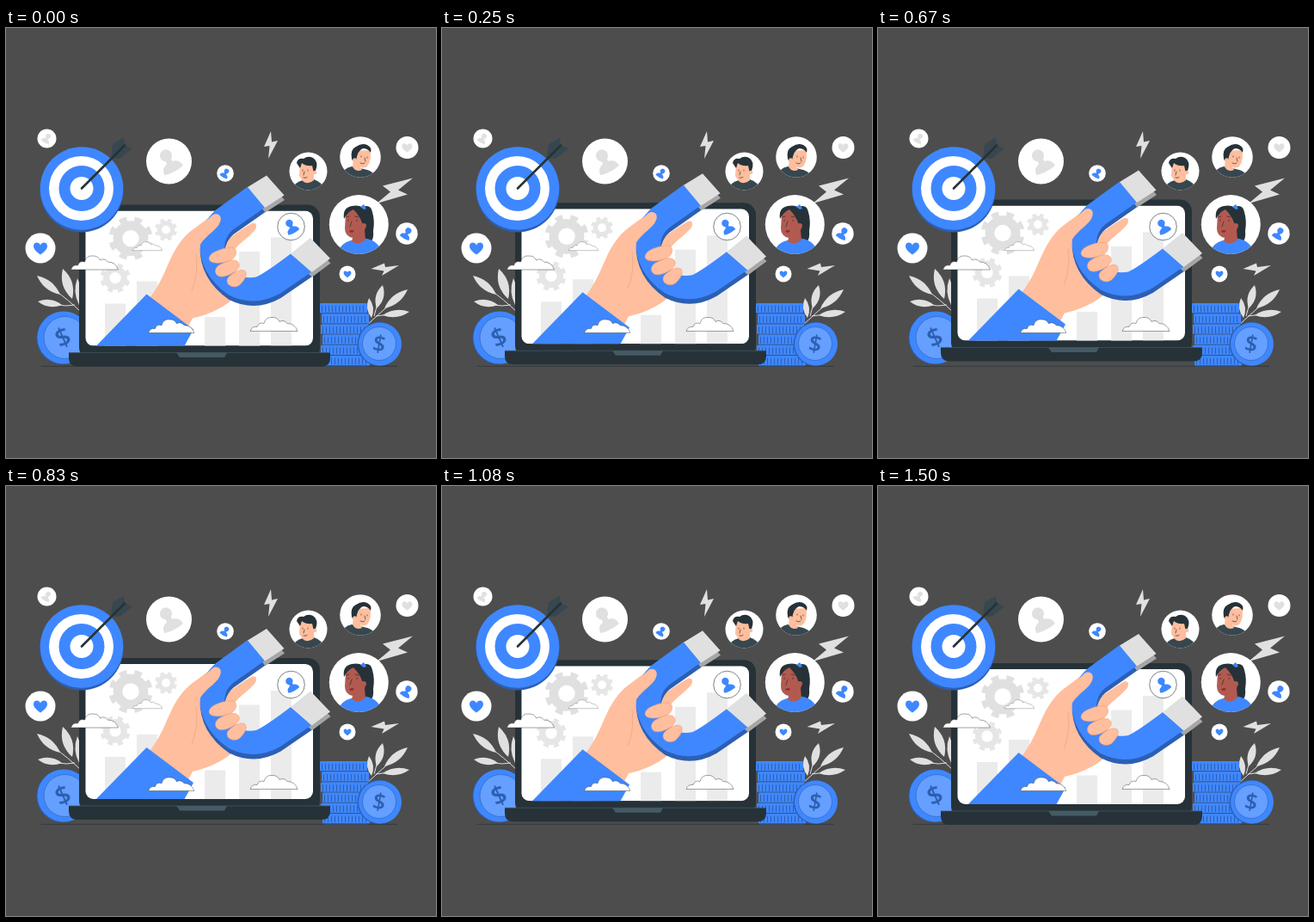
These frames come from a looping animation (500 by 500 pixels, 1540 ms). An HTML page:

```html
<!DOCTYPE html>
<html lang="en">
<head>
<meta charset="utf-8">
<title>Magnet marketing</title>
<style>
html, body { margin: 0; width: 100%; height: 100%; overflow: hidden; background: #4d4d4d; }
svg { display: block; width: 100%; height: 100%; }
text { font: 600 30px "Open Sans", sans-serif; text-anchor: middle; }
.blue { fill: #3f87ff; }
.deep { fill: #2c5fb3; }
.dark { fill: #263238; }
.slate { fill: #37474f; }
.white { fill: #fff; }
.pale { fill: #ebebeb; }
.grey { fill: #e0e0e0; }
.shade { fill: #a6a6a6; }
.skin { fill: #ffbe9d; }
.brown { fill: #b25a50; }
.face { fill: #659fff; stroke: #2c5fb3; stroke-width: .6; }
.line { fill: none; stroke: #263238; stroke-width: .7; stroke-linecap: round; }
</style>
</head>
<body>
<svg viewBox="0 0 500 500">
<defs>
  <g id="person">
    <circle cy="-7.5" r="7"/>
    <path d="M-12 12C-12 4-7 3-3.500 1.500V-3H3.500V1.500C7 3 12 4 12 12Q0 15-12 12Z"/>
  </g>
  <path id="heart" d="M0 7.500C-5 4-8 1-8-2.500C-8-7-2-8 0-3.500C2-8 8-7 8-2.500C8 1 5 4 0 7.500Z"/>
  <path id="cloud" d="M0 17Q2 11 8 12Q10 6 16 8Q18 0 26 1Q32 1 34 6Q39 3 43 8Q52 8 55 17Z"/>
  <path id="magnet" d="M281 184L301 208L264 234Q250 246 256 266Q266 294 291 289Q302 284 331 262L355.500 283L319 308Q289 325 259 310Q224 286 225 247Q228 225 244 211Z"/>
  <path id="tips" d="M281 184.500L303 171L323.500 194L301 208.500ZM331 262L354 243.500L377 267.500L355.500 283.500Z"/>
  <clipPath id="screen"><rect x="92.500" y="212" width="264.500" height="157" rx="9"/></clipPath>
  <clipPath id="c1"><circle cx="351.500" cy="166.500" r="22"/></clipPath>
  <clipPath id="c2"><circle cx="412" cy="150" r="23.800"/></clipPath>
  <clipPath id="c3"><circle cx="410.300" cy="228.500" r="34.500"/></clipPath>
</defs>

<path class="line" d="M41 393.300H455"/>
<g id="leaves"></g>

<!-- coins -->
<circle class="deep" cx="66" cy="360.500" r="30.500"/>
<circle class="blue" cx="67" cy="360" r="30.500"/>
<circle class="face" cx="68.500" cy="360" r="24.500"/>
<text class="deep" transform="translate(66 359.500) rotate(-24)" y="10.700">$</text>
<g id="stack"></g>
<circle class="deep" cx="434" cy="367.500" r="25.500"/>
<circle class="blue" cx="435" cy="367.500" r="25"/>
<circle class="face" cx="434" cy="367" r="19.500"/>
<text class="deep" transform="translate(434 367) rotate(10) scale(.88)" y="10.700">$</text>

<!-- laptop, hand and magnet -->
<g id="float">
  <rect class="dark" x="85" y="205" width="280" height="180" rx="14"/>
  <path class="dark" d="M73 377H377V383Q377 393 367 393H83Q73 393 73 383Z"/>
  <path d="M73 377H377" stroke="#455a64" stroke-width=".7"/>
  <path d="M198 377H257L254 382.500H202Z" fill="#455a64"/>
  <g clip-path="url(#screen)">
    <path class="white" d="M92 212H357V369H92Z"/>
    <path class="pale" d="M115 320h24v49h-24ZM152 294h24v75h-24ZM231 335.500h24v34h-24ZM271 259.500h24v110h-24ZM308 243h24v126h-24Z"/>
    <g id="gears"></g>
  </g>
  <path class="skin" d="M166 315C180 296 184 284 190 271C197 255 205 243 217 234L240 217C246 213 252 218 249 225L240 250L262 290L270 309C255 324 238 332 217 337L210 350Z"/>
  <path class="blue" clip-path="url(#screen)" d="M104 370L163.500 309L218 350L207 370Z"/>
  <path class="skin" d="M251 250C261 243 276 232 285 227C291 224 293 230 289 235C280 245 269 251 263 261Z"/>
  <g transform="translate(.5 5.500)">
    <use href="#magnet" class="deep"/>
    <use href="#tips" class="shade"/>
  </g>
  <use href="#magnet" class="blue"/>
  <use href="#tips" class="grey"/>
  <!-- thumb and fingers in front -->
  <path class="skin" d="M208 247L240 217C246 213 252 218 249 225C246 234 234 239 226 251L224 276Z"/>
  <g stroke="#eb996e" stroke-width=".5">
    <path class="skin" d="M242 260C248 257 257 254 264 255C270 257 268 266 262 269C255 272 247 274 240 272C234 270 235 264 242 260Z"/>
    <path class="skin" d="M248 275C255 271 262 268 268 270C273 273 272 279 266 283C260 287 252 290 247 288C242 285 242 279 248 275Z"/>
    <path class="skin" d="M261 287C267 282 273 279 278 282C281 286 278 292 273 297C269 302 261 301 258 297C256 293 257 290 261 287Z"/>
    <path d="M221 262Q224 286 216 305" fill="none"/>
  </g>
</g>

<!-- target -->
<circle class="deep" cx="88" cy="189" r="48.500"/>
<circle class="blue" cx="88" cy="186.500" r="48.300"/>
<circle class="white" cx="87.500" cy="186.500" r="37.500"/>
<circle class="blue" cx="88" cy="186.500" r="26.500"/>
<circle class="white" cx="88" cy="186.500" r="13.500"/>
<path class="slate" d="M122 151L124 135L137 127.500L138 136.500L147 140L132 152Z"/>
<path d="M88 186.500L138 136.500" stroke="#263238" stroke-width="2.600" stroke-linecap="round"/>

<!-- bolts -->
<path class="grey" d="M308 120L300 138L306.500 137L305 152L316 131L309 132.500ZM473 174.500L438 183.500L447 190.500L431 204L467 193.500L456 188.500ZM424.500 280L440 273.500L441 278L457 276L437 288L439.500 282.500Z"/>

<g id="bubbles"></g>

<!-- portraits -->
<g clip-path="url(#c1)">
  <path class="white" d="M329 144h45v45h-45Z"/>
  <path class="slate" d="M331 190Q334 180 345 177L358 176Q368 179 371 190Z"/>
  <path class="skin" d="M342 157Q350 154 358 157L358 177Q351 183 345 178L341 172Z"/>
  <path class="dark" d="M338 157Q339 151 346 152Q351 148 357 151Q364 155 360 166L358 169L356 160Q349 161 344 157L342 163Q340 160 338 157Z"/>
  <circle class="skin" cx="359" cy="168" r="2.300"/>
  <path class="line" d="M345 165v1M351 165v1M347 167l-1 4M346 174q2 1 4-.5"/>
</g>
<g clip-path="url(#c2)">
  <path class="white" d="M388 126h48v48h-48Z"/>
  <path class="slate" d="M388 176Q391 163 402 161L416 164Q428 166 433 176Z"/>
  <path class="skin" d="M405 143L423 142Q426 153 420 161Q415 164 412 161L414 165Q406 168 403 161Z"/>
  <path class="dark" d="M402 152Q400 141 407 138Q414 133 420 136Q426 139 424 145Q421 140 415 140Q409 142 407 154Q403 156 402 152Z"/>
  <circle class="skin" cx="405.500" cy="153.500" r="2.300"/>
  <path class="line" d="M413 149v1M420 150v1M417 151l1 4M412 157q3 2 5 0"/>
</g>
<g clip-path="url(#c3)">
  <path class="white" d="M375 193h71v71h-71Z"/>
  <path class="dark" d="M412 209Q424 203 426 214Q429 224 427 236Q428 245 424 249Q414 246 415 234Z"/>
  <path class="blue" d="M384 265Q388 250 401 247L420 245Q434 248 439 265Z"/>
  <path class="brown" d="M395 215Q404 207 415 212L419 226L417 236L418 246Q410 254 402 248L403 244Q394 242 394 233Z"/>
  <path class="dark" d="M393 222Q391 209 402 207Q415 204 420 216L419 232L415 229Q412 219 404 211Q398 213 393 222Z"/>
  <path class="blue" d="M412 208l4-3 3 5-3 1Z"/>
  <circle class="brown" cx="416" cy="230" r="3"/>
  <path class="line" d="M398 223v1.500M408 223v1.500M396 220l3-1M406 219l4 1M402 225l-2 6"/>
  <path d="M399 236q4-2 6 0q-3 4-6 0Z" fill="#8e2f2f"/>
</g>

<g id="clouds"></g>
</svg>
<script>
const $ = id => document.getElementById(id);
const add = (id, markup) => { $(id).innerHTML += markup; };

function gear(x, y, r, fill) {
  add("gears", `<g transform="translate(${x} ${y}) scale(${r / 25})" fill="${fill}">
    <circle r="20"/><circle r="21.500" fill="none" stroke="${fill}" stroke-width="7"
    pathLength="16" stroke-dasharray="1" transform="rotate(11)"/><circle r="9.500" fill="#fff"/></g>`);
}

function leaf(x, y, tipX, tipY, width) {
  const dx = tipX - x, dy = tipY - y, len = Math.hypot(dx, dy);
  const nx = -dy / len * width, ny = dx / len * width;
  const mx = x + dx * .5, my = y + dy * .5;
  add("leaves", `<path class="grey" d="M${x} ${y}Q${mx + nx} ${my + ny} ${tipX} ${tipY}Q${mx - nx} ${my - ny} ${x} ${y}"/>`);
}

function bubble(x, y, r, icon, fill, scale, angle = 0, outline = "none") {
  add("bubbles", `<circle class="white" cx="${x}" cy="${y}" r="${r}" stroke="${outline}" stroke-width=".6"/>
    <use href="#${icon}" class="${fill}" transform="translate(${x} ${y}) rotate(${angle}) scale(${scale})"/>`);
}

function cloud(x, y, scale) {
  add("clouds", `<use href="#cloud" class="white" stroke="#263238" stroke-width=".45"
    transform="translate(${x} ${y}) scale(${scale})"/>`);
}

gear(145, 244, 25.5, "#e0e0e0");
gear(186, 234, 13, "#e6e6e6");
gear(127, 290, 17.5, "#e6e6e6");

add("leaves", `<path d="M88 331Q70 314 58 306M86 328V318M80 322Q70 324 60 322M418 347Q436 330 455 314M428 335Q432 320 434 315M430 335Q445 333 455 332"
  fill="none" stroke="#e0e0e0" stroke-width="1"/>`);
leaf(77, 315, 66, 280, 11);
leaf(85, 322, 83, 291, 7);
leaf(63, 310, 36, 288, 9);
leaf(65, 322, 37, 318, 8);
leaf(431, 326, 438, 299, 9);
leaf(425, 337, 422, 314, 7);
leaf(440, 326, 467, 304, 9);
leaf(438, 334, 469, 330, 8);

[365, 367, 366, 368, 366, 368].forEach((x, i) => {
  const y = 320 + i * 12.2;
  add("stack", `<rect class="blue" x="${x}" y="${y}" width="55" height="12.200" rx="1.500"/>
    <path d="M${x + 2} ${y + 6.5}h51" stroke="#2c5fb3" stroke-width="7.500" stroke-dasharray="1 3"/>
    <path d="M${x} ${y + 11.7}h55" stroke="#263238" stroke-width=".6"/>`);
});

bubble(47.5, 128.5, 11, "person", "grey", .42, 30);
bubble(189.5, 155, 26.5, "person", "grey", 1, -28);
bubble(255, 169, 9.8, "person", "blue", .4, 30);
bubble(40, 256, 17.5, "heart", "blue", 1);
bubble(466.5, 139, 13, "heart", "grey", .75);
bubble(466, 239, 12.7, "person", "blue", .5, 30);
bubble(397, 286, 9.5, "heart", "blue", .55);
bubble(331.5, 231, 15.8, "person", "blue", .6, -28, "#263238");

cloud(75.5, 264, 1);
cloud(147, 248, .63);
cloud(165.5, 338, .97);
cloud(284, 335.5, 1);

const PERIOD = 1540, LIFT = 7;

function tick() {
  const phase = (performance.now() + 45) % PERIOD / PERIOD;
  const rise = 1 - Math.abs(2 * phase - 1);
  $("float").setAttribute("transform", `translate(0 ${1 - LIFT * rise})`);
  requestAnimationFrame(tick);
}
tick();
</script>
</body>
</html>
```
